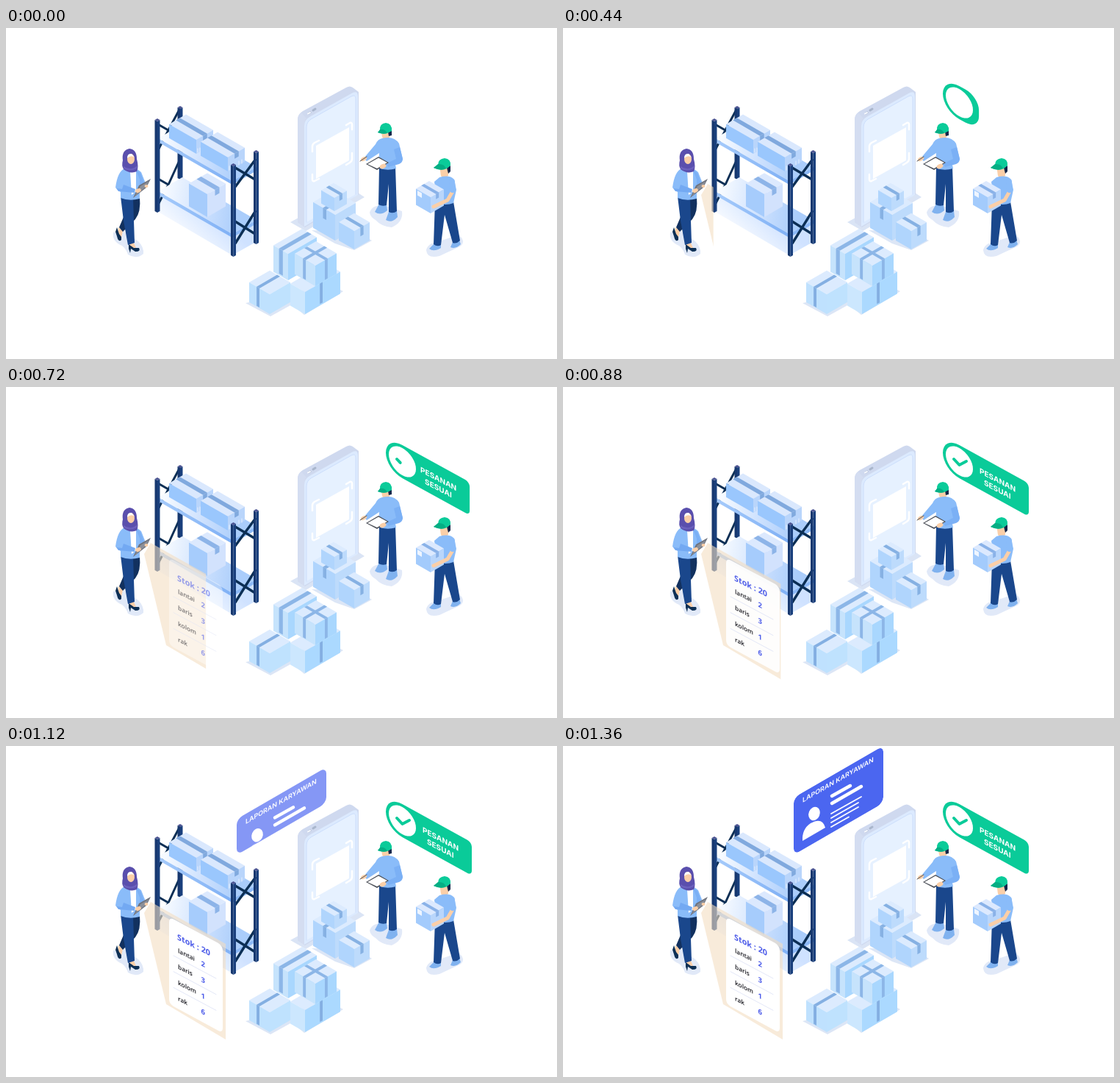
Recreate the animation shown at these times as an HTML page with a canvas. Size 750 px wide and 450 px high, loop 1920 ms.

```html
<!DOCTYPE html>
<html lang="id">
<head>
<meta charset="utf-8">
<title>Stok gudang</title>
<style>
html, body { margin: 0; width: 100%; height: 100%; overflow: hidden; background: #fff; }
canvas { display: block; width: 750px; height: 450px; }
</style>
</head>
<body>
<canvas id="stage" width="750" height="450"></canvas>
<script>
const ctx = document.getElementById('stage').getContext('2d');
const LOOP = 1920, STEP = 40, SLOPE = 0.577;
const SKIN = '#fbcfa8', NAVY = '#1a478c', DARK = '#0c2f55', SHIRT = '#8abcf9', SHADE = '#7bb0f5';
const GREEN = '#0acb99', SHOE = '#80b2ef', HAIR = '#14264a', SHADOW = '#e1e9f8';

const clamp = v => Math.min(1, Math.max(0, v));
const ease = (t, from, to) => (1 - Math.cos(Math.PI * clamp((t - from) / (to - from)))) / 2;

function fill(color, path) {
  ctx.fillStyle = color;
  ctx.fill(new Path2D(path));
}

function stroke(color, width, path, cap = 'round') {
  ctx.strokeStyle = color;
  ctx.lineWidth = width;
  ctx.lineCap = cap;
  ctx.lineJoin = 'round';
  ctx.stroke(new Path2D(path));
}

function oval(color, x, y, rx, ry = rx, turn = 0) {
  ctx.fillStyle = color;
  ctx.beginPath();
  ctx.ellipse(x, y, rx, ry, turn, 0, Math.PI * 2);
  ctx.fill();
}

function gradient(x0, y0, x1, y1, ...colors) {
  const g = ctx.createLinearGradient(x0, y0, x1, y1);
  colors.forEach((c, i) => g.addColorStop(i / (colors.length - 1), c));
  return g;
}

function group(draw) {
  ctx.save();
  draw();
  ctx.restore();
}

function label(text, x, y, slope, font, color) {
  group(() => {
    ctx.transform(1, slope, 0, 1, x, y);
    ctx.font = font;
    ctx.fillStyle = color;
    ctx.fillText(text, 0, 0);
  });
}

// (x, y) is the front top corner; l and r are the widths of the left and right faces.
// A tape is [face, start, end, drop]: it crosses the top and hangs down that face.
function box(x, y, l, r, h, [top, left, right, tape], tapes = []) {
  const at = (a, b, d = 0) => `${x - a * l + b * r} ${y - SLOPE * (a * l + b * r) + d}`;
  const quad = (color, ...p) => fill(color, 'M' + p.join('L') + 'Z');
  quad(top, at(0, 0), at(1, 0), at(1, 1), at(0, 1));
  quad(left, at(0, 0), at(1, 0), at(1, 0, h), at(0, 0, h));
  quad(right, at(0, 0), at(0, 1), at(0, 1, h), at(0, 0, h));
  for (const [face, s, e, drop] of tapes) {
    const p = face === 'R' ? (v, w, d) => at(w, v, d) : (v, w, d) => at(v, w, d);
    quad(tape, p(s, 0), p(s, 1), p(e, 1), p(e, 0));
    quad(tape, p(s, 0), p(e, 0), p(e, 0, drop), p(s, 0, drop));
  }
}

const shelfBox = ['#dae8fd', '#9ac7fd', '#b9d5fb', '#80a9de'];
const paleBox = ['#dce9fe', '#a6ccfc', '#d2e2fd', '#8db4e8'];
const stackBox = ['#dcebfe', '#b0d5fd', '#bddbfc', '#86b1e3'];
const frontBox = ['#dcebfe', '#bfe1fe', '#bfe2fe', '#84afe2'];
const sideBox = ['#dcebfe', '#c6e3fc', '#a9d7fe', '#8cb6e7'];

function post(x, y, h) {
  fill('#17386f', `M${x} ${y}l3.5 2v${h}l-3.500 -2z`);
  fill('#1a407d', `M${x + 3.5} ${y + 2}l3.5 -2v${h}l-3.500 2z`);
  fill('#4d5693', `M${x} ${y}l3.5 -2l3.5 2l-3.500 2z`);
}

function shelfBoard(y) {
  fill(gradient(215, y + 5, 320, y + 20, '#f6faff', '#cfe2fe', '#aacdfb'),
    `M207 ${y}L240 ${y - 19}L341 ${y + 39}L308 ${y + 58}Z`);
  fill(gradient(207, 0, 308, 0, '#a6cbfb', '#7fb0f5'), `M207 ${y}L308 ${y + 58}v5L207 ${y + 5}Z`);
  fill('#8cb9f6', `M308 ${y + 58}L341 ${y + 39}v5L308 ${y + 63}Z`);
}

function shelf() {
  fill(gradient(285, 253, 240, 300, '#cfe2ff', '#ffffff'), 'M209 226L308 284L340 265V291L308 309L209 251Z');
  stroke(DARK, 3, 'M207 131L221 139L237 109M207 166L221 139M207 205L221 213L237 178M207 240L221 213', 'butt');
  post(233.5, 108, 96);
  shelfBoard(222);
  box(274, 226, 25, 25, 31, paleBox, [['R', .42, .66, 8]]);
  shelfBoard(150);
  box(259, 152, 37, 23, 19, shelfBox, [['R', .4, .64, 7]]);
  box(302, 176, 37, 23, 19, shelfBox, [['R', .4, .64, 7]]);
  stroke('#e5efff', 1, 'M261 164v5M264 163v5M304 188v5M307 187v5M317 181v5M321 179v5');
  stroke(DARK, 3.4, 'M312 190L339 206M312 216L340 178M312 263L339 280M312 293L340 248', 'butt');
  post(202.5, 125, 124);
  post(337, 168, 124);
  post(306, 186, 123);
}

function phone() {
  fill('#dae4f5', 'M387 264L398 258L479 224L488 230L408 276Z');
  fill('#cfd9ef', 'M397 264V125Q397 117 404 113L463 81Q468 78 472 81L480 87V226L407 271Z');
  fill('#d4ddf1', 'M397 264V125Q397 118 402 115L409 123Q406 127 406 134V270Z');
  fill('#dceafe', 'M406 270V133Q406 125 413 121L472 88Q479 85 479 93V227Z');
  fill('#e6f1ff', 'M409 264V135Q409 128 415 124L470 93Q476 90 476 96V226Z');
  stroke('#c7dafa', .8, 'M409 264V135Q409 128 415 124L470 93Q476 90 476 96V226');
  stroke('#a9b6cc', 3, 'M412 116L414 115M418 112L421 110');
  stroke('#f5f8ff', 2, 'M411 116.500L414 115');
  stroke('#fff', 2.5, 'M417 168V161Q417 158 420 156L426 153M463 132L468 129Q471 128 471 131V138' +
    'M417 199V206Q417 209 420 208L426 205M463 186L468 183Q471 181 471 178V170');
  fill('#fff', 'M422 160L467 135V180L422 205Z');
}

function boxes() {
  fill('#dce6f6', 'M416 275L448 293L474 302L498 289L478 277Z');
  box(448, 254, 30, 28, 35, stackBox, [['L', .4, .55, 14]]);
  box(447, 231, 18, 17, 18, stackBox, [['R', .4, .64, 8]]);
  box(474, 276, 21, 21, 25, stackBox, [['R', .4, .6, 12]]);

  fill('#dce6f6', 'M326 374L360 392L389 376L406 390L459 358L440 348Z');
  box(384, 307, 20, 39, 36, sideBox, [['L', .36, .62, 34]]);
  box(407, 359, 20, 48, 30, ['#dcebfe', '#cce7fe', '#abd9ff', '#84afe2'], [['R', .42, .5, 28]]);
  box(421, 323, 28, 29, 28, sideBox, [['L', .46, .6, 27], ['R', .45, .58, 27]]);
  box(359, 362, 28, 28, 27, frontBox, [['L', .5, .64, 26]]);
}

function woman() {
  fill(SHADOW, 'M146 278Q144 290 158 296Q164 301 166 308Q178 315 187 307Q188 298 180 290L160 276Z');
  fill(SKIN, 'M153 271L159 276L157 285L152 281ZM167 290H173L177 299L169 298Z');
  fill(DARK, 'M151 271L154 280L157 284V288Q153 292 151 283L149 277ZM167 294L174 299L181 299Q184 304 176 304L170 300L169 306L167 300Z');
  fill('#12315f', 'M166 229L182 230Q184 250 176 260L159 277L154 271L163 250Z');
  fill(NAVY, 'M156 229L173 231L174 262L175 292L166 295L160 262Z');
  fill(SHIRT, 'M162 191Q152 194 149 217L156 223V231Q168 236 182 232V218L190 211L184 196Q176 188 162 191Z');
  fill('#fff', 'M169 195L177 194V222L171 227Z');
  fill('#73a9f2', 'M160 213L176 219L175 224L153 222L150 218L158 219Z');
  fill(SHADE, 'M177 193L183 197L188 211L182 218V206Z');
  fill('#5a4fad', 'M159 180Q157 166 168 164Q178 165 178 178Q181 189 178 195Q169 199 160 192Q157 187 159 180Z');
  fill('#6b61bd', 'M160 188Q170 195 179 187L178 191Q168 196 160 191Z');
  oval(SKIN, 170, 178, 5, 7);
  fill('#fff', 'M165 177Q165 170 171 171L175 176Q170 172 165 177Z');
  fill('#6f737d', 'M173 231L181 214L197 205L191 217Z');
  fill('#8b8f99', 'M175 229L183 215L195 208L190 216Z');
  oval(SKIN, 180, 221, 4, 2.6, -.4);
  oval(SKIN, 191, 215, 2.5, 2);
}

function checker() {
  fill(SHADOW, 'M495 251Q498 240 514 241L539 249Q541 264 525 271Q511 270 503 261Q496 257 495 251Z');
  fill(SHOE, 'M508 239L518 240L519 248Q510 256 502 250ZM521 250L532 249L533 257Q525 266 517 261Z');
  fill(NAVY, 'M508 188H530L532 249Q527 253 521 250L521 212L518 241Q512 243 507 240Z');
  fill(SKIN, 'M511 138H522V149Q520 154 514 152Q511 148 511 138Z');
  fill(SHIRT, 'M512 150Q528 146 535 157L540 178Q538 184 530 186L531 191Q518 195 507 190L508 170L491 181L487 177L503 158Q506 151 512 150Z');
  fill(SHADE, 'M528 165L531 178L518 184L520 189L535 185Q540 183 540 178L536 162Z');
  fill(HAIR, 'M520 141L525 138V146L521 147Z');
  fill(GREEN, 'M509 139Q508 130 517 129Q526 130 525 140L519 143Q513 145 506 142Z');
  fill('#05ae84', 'M509 138Q516 137 519 143Q513 145 506 142Z');
  fill('#4b4f57', 'M490 185L507 175L521 183L505 193Z');
  fill('#fff', 'M492 185L507 176.500L519 183L505 191Z');
  oval(SKIN, 487, 178, 4.5, 2.5, -.5);
  oval(SKIN, 513, 188, 4.5, 3, -.4);
  stroke('#4b4f57', 1, 'M482 181L491 175');
}

function carrier() {
  fill(SHADOW, 'M572 302Q574 292 590 290L616 281Q627 290 618 297L590 310Q573 314 572 302Z');
  fill(SHOE, 'M583 293L592 295V299Q582 305 576 300ZM608 291L617 288L619 294Q612 301 605 298Z');
  fill(NAVY, 'M584 236H609L618 289Q613 294 608 292L597 254L592 295Q587 298 582 294Z');
  fill(SKIN, 'M590 187H602V201Q596 206 592 201Z');
  fill(SHIRT, 'M590 203Q604 199 610 206L613 220L609 238Q599 242 587 238L583 209Z');
  fill(HAIR, 'M600 190L605 187V195L602 198Z');
  fill(GREEN, 'M588 186Q588 178 597 177Q606 178 605 187L600 191Q593 195 582 190Z');
  fill('#05ae84', 'M588 185Q596 184 599 191Q592 195 582 190Z');
  box(578, 230, 20, 18, 22, ['#dce9fe', '#a3cbfc', '#b9d6fb', '#8ab2e8'], [['R', .4, .62, 7]]);
  fill('#eef5ff', 'M560 221L566 224.500V231L560 227.500Z');
  stroke(SKIN, 5, 'M608 222L601 234L582 243');
  stroke(SHIRT, 8, 'M607 209L608 220');
}

function stockCard(t) {
  const edge = 180 + 119 * ease(t, 220, 950);
  const cream = 'rgba(243,222,194,.6)';
  group(() => {
    ctx.beginPath();
    ctx.rect(0, 0, edge, 450);
    ctx.clip();
    fill(cream, 'M188 227L197 212L299 269V399L218 351Z');
  });
  group(() => {
    ctx.globalAlpha = ease(t, 540, 960);
    fill('#fff', 'M222 240Q222 232 229 236L289 268Q295 272 295 279V383Q295 390 289 387L228 354Q222 350 222 344Z');
  });
  group(() => {
    ctx.globalAlpha = ease(t, 480, 920);
    label('Stok : 20', 233, 263, .5, '700 10.8px "Open Sans", sans-serif', '#4d5ce9');
    ['lantai', 'baris', 'kolom', 'rak'].forEach((name, i) => {
      const y = 281 + 21.7 * i;
      label(name, 234, y, .5, '600 8.3px "Open Sans", sans-serif', '#1b1b22');
      label('2316'[i], 265.5, y + 17.5, .5, '700 9.5px "Open Sans", sans-serif', '#4d5ce9');
      if (i < 3) stroke('#dce1f5', .8, `M228 ${y + 4}L286 ${y + 35}`);
    });
  });
}

function orderBadge(t) {
  if (t < 80) return;
  const pop = t < 240 ? 1.18 * Math.sin(Math.PI / 2 * (t - 40) / 200) : 1.18 - .18 * ease(t, 240, 380);
  const shift = -72 * (1 - ease(t, 380, 770));
  const width = 117 + shift, corner = Math.max(6, 67.5 - width);
  group(() => {
    ctx.transform(1, .55, 0, 1, 539.5, 101.5);
    ctx.scale(pop, pop);
    ctx.fillStyle = GREEN;
    ctx.beginPath();
    ctx.roundRect(-22.5, -22.5, width, 45, [22.5, corner, corner, 22.5]);
    ctx.fill();
    oval('#fff', 0, 0, 18.5);
  });
  group(() => {
    ctx.beginPath();
    ctx.rect(559.5, 60, 80, 130);
    ctx.clip();
    ctx.translate(shift, shift * .55);
    label('PESANAN', 567, 117, .53, '700 10px Inter, sans-serif', '#fff');
    label('SESUAI', 573, 133, .53, '700 10px Inter, sans-serif', '#fff');
  });
  const drawn = clamp((t - 670) / 190);
  if (drawn > 0) group(() => {
    ctx.setLineDash([26 * drawn, 60]);
    stroke(GREEN, 4, 'M532 98L539.5 106L549 101');
  });
}

function reportCard(t) {
  const shown = ease(t, 740, 1360);
  if (!shown) return;
  const card = () => {
    ctx.beginPath();
    ctx.roundRect(0, 0, 122, 78, 8);
  };
  const skew = () => ctx.transform(1, -SLOPE, 0, 1, 314, 70);
  group(() => {
    skew();
    card();
    ctx.clip();
    ctx.setTransform(1, 0, 0, 1, 0, 90 * (1 - shown));
    group(() => {
      skew();
      card();
      ctx.globalAlpha = shown;
      ctx.fillStyle = '#4b66f0';
      ctx.fill();
    });
    label('LAPORAN KARYAWAN', 326, 77, -SLOPE, '600 8.9px Inter, sans-serif', '#fff');
    oval('#fff', 342, 92, 7.5, 9.5, .4);
    fill('#fff', 'M326 129Q325 113 337 105Q353 96 357 111Z');
    stroke('#fff', 4.5, 'M366 68L391 54M366 78L406 55');
    stroke('#fff', 1.8, 'M365 92L406 69M365 98L402 77M365 104L402 83M365 110L389 96.500');
  });
}

function draw(t) {
  ctx.fillStyle = '#fff';
  ctx.fillRect(0, 0, 750, 450);
  shelf();
  woman();
  phone();
  boxes();
  checker();
  carrier();
  stockCard(t);
  orderBadge(t);
  reportCard(t);
}

const start = performance.now();
function tick() {
  const t = (performance.now() - start) % LOOP;
  draw(Math.floor(t / STEP) * STEP);
  requestAnimationFrame(tick);
}
tick();
</script>
</body>
</html>
```
